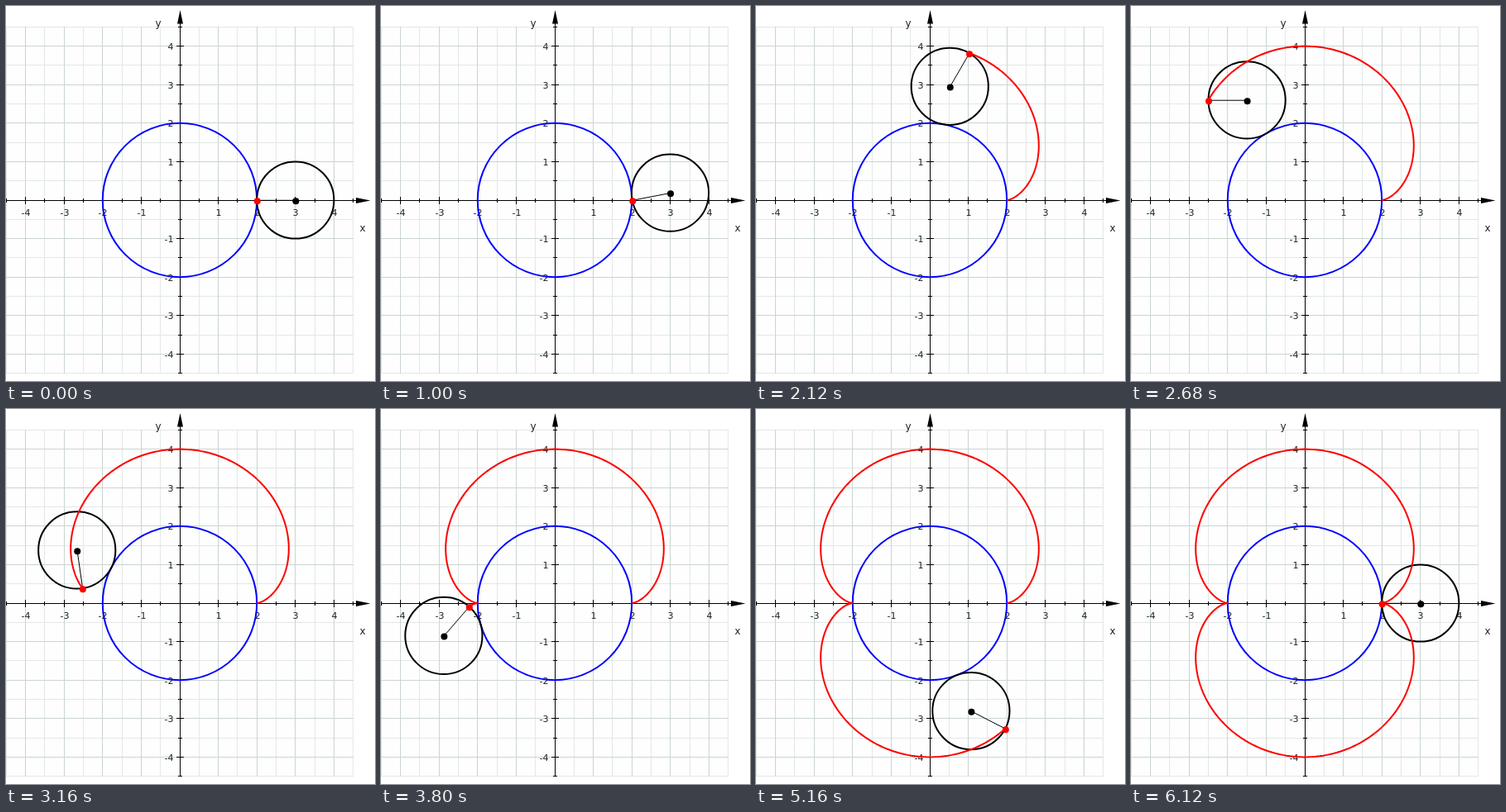
These frames come from a looping animation (446 by 454 pixels, 8.12 s). An HTML page:

```html
<!DOCTYPE html>
<html lang="en">
<head>
<meta charset="utf-8">
<title>Rolling circle</title>
<style>
  html, body { margin: 0; width: 100%; height: 100%; overflow: hidden; background: #fff; }
  svg { display: block; width: 100%; height: 100%; }
  text { font-family: "DejaVu Sans", sans-serif; font-size: 11px; fill: #222; }
  .name { font-size: 12px; text-anchor: middle; }
  .crisp { shape-rendering: crispEdges; fill: none; stroke-width: 1; }
  .curve { fill: none; stroke-width: 2; stroke-linejoin: round; }
</style>
</head>
<body>
<svg viewBox="0 0 446 454">
  <rect y="25" width="420" height="420" fill="#fdfefd"/>
  <path id="minor" class="crisp" stroke="#e3e8e6"/>
  <path id="major" class="crisp" stroke="#cad5d2"/>
  <path id="axes" class="crisp" stroke="#000"/>
  <path d="M440.5 235.5L423 232v7zM210.5 5L207 21.5h7z"/>
  <g id="labels"></g>
  <text class="name" x="184" y="25">y</text>
  <text class="name" x="431" y="273">x</text>
  <circle class="curve" cx="210" cy="235" r="93.2" stroke="#00f"/>
  <circle id="wheel" class="curve" r="46.6" stroke="#000"/>
  <path id="trail" class="curve" stroke="#f00"/>
  <line id="arm" stroke="#000"/>
  <circle id="hub" r="4"/>
  <circle id="pen" r="4" fill="#f00"/>
</svg>
<script>
const UNIT = 46.6, OX = 210, OY = 235;
const LOOP = 8120, HOLD = 1000, STEP = 80, CHANGES = 65, POSES = 99, SUB = 4;

const $ = id => document.getElementById(id);
const px = x => OX + UNIT * x;
const py = y => OY - UNIT * y;
const snap = v => Math.floor(v) + 0.5;
const set = (el, attrs) => { for (const k in attrs) el.setAttribute(k, attrs[k]); };

function addLabel(value, x, y, anchor) {
  const el = document.createElementNS("http://www.w3.org/2000/svg", "text");
  set(el, { x, y, "text-anchor": anchor });
  el.textContent = value;
  $("labels").append(el);
}

function drawPlane() {
  const grid = { minor: "", major: "" };
  let axes = "M0 235.5H424M210.5 20V445";
  for (let i = -9; i <= 9; i++) {
    const v = i / 2, x = snap(px(v)), y = snap(py(v));
    const whole = i % 2 === 0, half = whole ? 4.5 : 2.5;
    grid[whole ? "major" : "minor"] += `M${x} 25V445M0 ${y}H420`;
    if (!i) continue;
    axes += `M${x} ${235.5 - half}v${2 * half}M${210.5 - half} ${y}h${2 * half}`;
    if (whole) {
      addLabel(v, x + 0.5, 254, "middle");
      addLabel(v, 202.5, y + 4.5, "end");
    }
  }
  set($("minor"), { d: grid.minor });
  set($("major"), { d: grid.major });
  set($("axes"), { d: axes });
}

const hubAt = a => [px(3 * Math.cos(a)), py(3 * Math.sin(a))];
const penAt = a => [
  px(3 * Math.cos(a) - Math.cos(3 * a)),
  py(3 * Math.sin(a) - Math.sin(3 * a))
];

// Markers sit slightly right of and below the curve points.
const placeDot = (el, [x, y]) => set(el, { cx: x + 0.5, cy: y + 1.2 });

const trailPoints = Array.from({ length: POSES * SUB + 1 }, (_, i) =>
  penAt(2 * Math.PI * i / (POSES * SUB)).map(v => v.toFixed(2)).join(" "));

function poseAt(time) {
  const t = time % LOOP;
  const change = t < HOLD ? 0 : Math.min(CHANGES, Math.floor((t - HOLD) / STEP) + 1);
  return Math.floor(change * POSES / CHANGES);
}

let shown = -1;
function draw(pose) {
  if (pose === shown) return;
  shown = pose;
  const a = 2 * Math.PI * pose / POSES;
  const hub = hubAt(a), pen = penAt(a);
  set($("wheel"), { cx: hub[0], cy: hub[1] });
  set($("arm"), { x1: hub[0] + 0.3, y1: hub[1] + 0.3, x2: pen[0] + 0.3, y2: pen[1] + 0.3 });
  set($("trail"), { d: "M" + trailPoints.slice(0, pose * SUB + 1).join("L") });
  placeDot($("hub"), hub);
  placeDot($("pen"), pen);
}

drawPlane();
draw(0);
const start = performance.now();
(function tick() {
  draw(poseAt(performance.now() - start));
  requestAnimationFrame(tick);
})();
</script>
</body>
</html>
```
